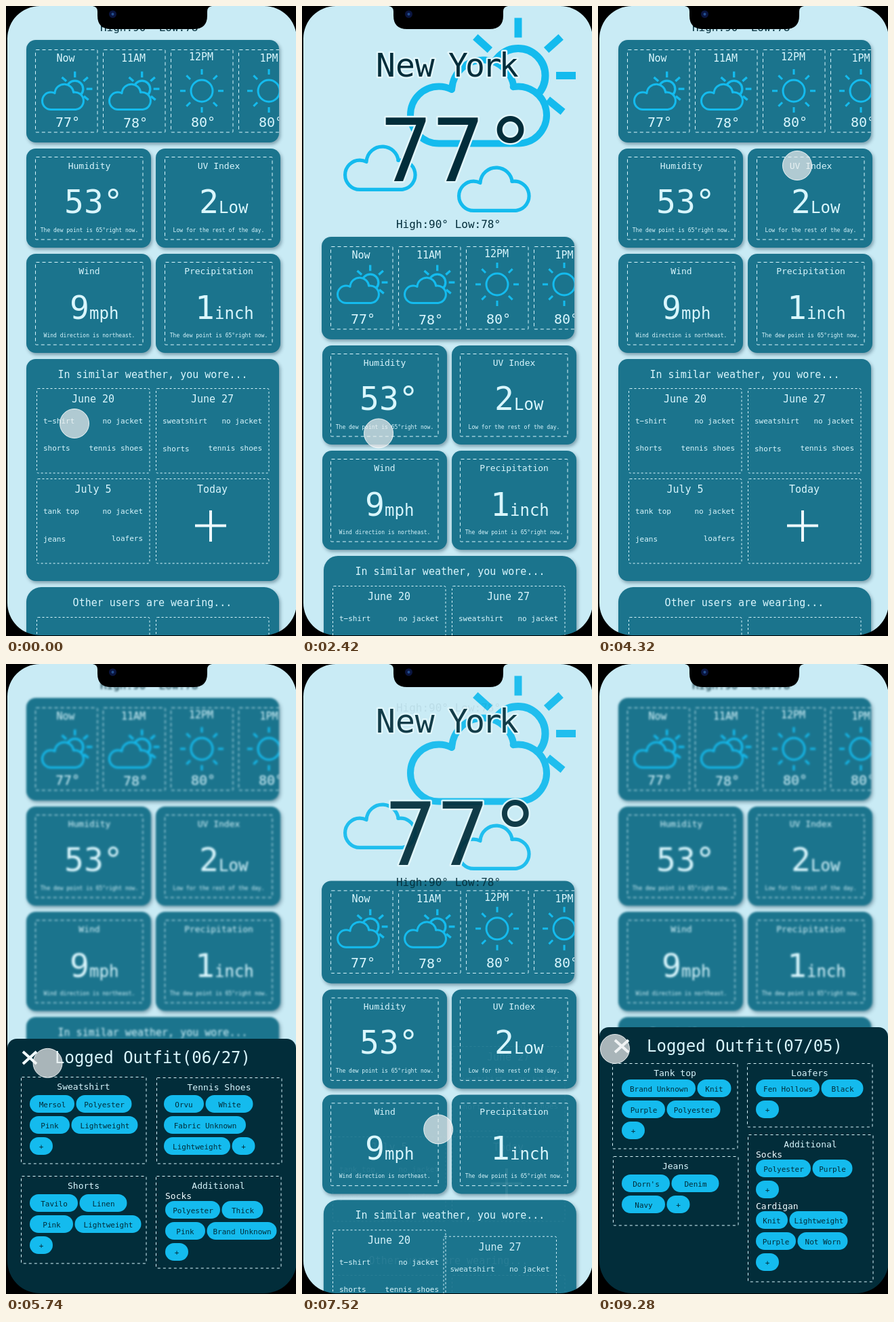
Animation, 428 px wide and 928 px high, one loop 9.66 s. Source, as an HTML page with a canvas:

```html
<!DOCTYPE html>
<html lang="en">
<head>
<meta charset="utf-8">
<title>Weather outfit log</title>
<style>
html, body { margin: 0; width: 100%; height: 100%; overflow: hidden; background: #000; }
canvas { display: block; width: 428px; height: 928px; }
</style>
</head>
<body>
<canvas id="stage"></canvas>
<script>
const W = 428, H = 928, LOOP = 9660, SCROLL = 290;
const dpr = window.devicePixelRatio || 1;
const SKY = '#c9ebf5', CARD = '#1b748d', PALE = '#d9f6fd', INK = '#022d3a', BLUE = '#14bbee';
const RAD = Math.PI / 180;
let c;

function setup(canvas) {
  canvas.width = W * dpr;
  canvas.height = H * dpr;
  const ctx = canvas.getContext('2d');
  ctx.scale(dpr, dpr);
  return ctx;
}
const clamp = v => Math.max(0, Math.min(1, v));
const smooth = u => u * u * (3 - 2 * u);
const easeOut = u => 1 - Math.pow(1 - u, 3);

// Drawing helpers
function text(str, x, y, size, align = 'center', color = PALE) {
  c.font = `${size}px "DejaVu Sans Mono", monospace`;
  c.textAlign = align;
  c.fillStyle = color;
  c.fillText(str, x, y);
}
function haloText(str, x, y, size, align, spacing = 0) {
  c.letterSpacing = spacing + 'px';
  c.font = `${size}px "DejaVu Sans Mono", monospace`;
  c.textAlign = align;
  c.lineJoin = 'round';
  c.lineWidth = 5;
  c.strokeStyle = '#e2f6fb';
  c.strokeText(str, x, y);
  text(str, x, y, size, align, INK);
  c.letterSpacing = '0px';
}
function round(x, y, w, h, r) {
  c.beginPath();
  c.roundRect(x, y, w, h, r);
}
function card(x, y, w, h, r = 14) {
  c.save();
  c.shadowColor = 'rgba(0,40,60,.38)';
  c.shadowBlur = 5 * dpr;
  c.shadowOffsetX = 2 * dpr;
  c.shadowOffsetY = 3 * dpr;
  c.fillStyle = CARD;
  round(x, y, w, h, r);
  c.fill();
  c.restore();
}
function dashed(x, y, w, h, dash, r = 1) {
  c.save();
  c.setLineDash(dash);
  c.lineWidth = 1;
  c.strokeStyle = PALE;
  round(x + .5, y + .5, w - .5, h - .5, r);
  c.stroke();
  c.restore();
}
function line(x1, y1, x2, y2, width, color) {
  c.lineWidth = width;
  c.strokeStyle = color;
  c.beginPath();
  c.moveTo(x1, y1);
  c.lineTo(x2, y2);
  c.stroke();
}
function shifted(dx, dy, alpha, draw) {
  c.save();
  c.translate(dx, dy);
  c.globalAlpha *= alpha;
  draw();
  c.restore();
}

// Icons
function sun(x, y, r, near, far, width, angles) {
  for (const a of angles) {
    const cos = Math.cos(a * RAD), sin = Math.sin(a * RAD);
    line(x + near * cos, y + near * sin, x + far * cos, y + far * sin, width, BLUE);
  }
  c.beginPath();
  c.arc(x, y, r, 0, 2 * Math.PI);
  c.stroke();
}
function cloud(left, bottom, scale, fill, withSun) {
  c.save();
  c.translate(left - 155 * scale, bottom - 207 * scale);
  c.scale(scale, scale);
  if (withSun) sun(319, 102, 40, 56, 85, 11, [-138, -90, -42, 0, 39]);
  c.beginPath();
  c.arc(202, 160, 42, 90 * RAD, 297 * RAD);
  c.arc(267, 125, 46, 184 * RAD, 352 * RAD);
  c.arc(319, 160, 42, 260 * RAD, 450 * RAD);
  c.closePath();
  c.lineWidth = 10;
  c.lineJoin = 'round';
  c.strokeStyle = BLUE;
  c.fillStyle = fill;
  c.fill();
  c.stroke();
  c.restore();
}

// Page sections, placed as in the scrolled state
function hourly(lift) {
  card(30, 50, 373, 151);
  c.save();
  round(30, 50, 373, 151, 14);
  c.clip();
  const hours = [['Now', '77°', 82, 178], ['11AM', '78°', 82, 179], ['12PM', '80°', 80, 178], ['1PM', '80°', 82, 178]];
  hours.forEach(([hour, temp, hourY, tempY], i) => {
    const x = i * 100;
    dashed(43 + x, 64, 92, 122, [5, 4]);
    text(hour, 88 + x, hourY, 15);
    text(temp, 91 + x, tempY, 20);
    if (i < 2) cloud(52 + 99 * i, 154 - lift, .303, CARD, true);
    else sun(289 + 99 * (i - 2), 125 - lift, 16, 24, 32, 3, [0, 45, 90, 135, 180, 225, 270, 315]);
  });
  c.restore();
}
function metric(x, y, dx, title, value, valueX, valueY, unit, note) {
  card(x, y, 184, 146);
  c.save();
  c.translate(dx, 0);
  dashed(x + 13, y + 12, 159, 122, [5, 4]);
  text(title, x + 93, y + 30, 13);
  text(value, valueX, valueY, 48, 'left');
  text(unit, valueX + 29, valueY, 24, 'left');
  text(note, x + 93, y + 123, 8);
  c.restore();
}
function metrics(dx) {
  metric(30, 210, dx, 'Humidity', '53°', 86, 305, '', 'The dew point is 65°right now.');
  metric(221, 210, dx, 'UV Index', '2', 285, 305, 'Low', 'Low for the rest of the day.');
  metric(30, 365, dx, 'Wind', '9', 94, 461, 'mph', 'Wind direction is northeast.');
  metric(221, 365, dx, 'Precipitation', '1', 279, 461, 'inch', 'The dew point is 65°right now.');
}
function dayBox(x, y, title, items = [], low = [0, 0]) {
  dashed(x, y, 167, 125, [3, 3], 2);
  text(title, x + 83.5, y + 21, 15);
  items.forEach((item, i) => {
    const right = i % 2, row = i >> 1;
    text(item, x + (right ? 157 : 10), y + 52 + 40 * row + (row ? low[right] : 0), 11, right ? 'right' : 'left');
  });
}
const june20 = () => dayBox(45, 563, 'June 20', ['t−shirt', 'no jacket', 'shorts', 'tennis shoes']);
const june27 = () => dayBox(221, 563, 'June 27', ['sweatshirt', 'no jacket', 'shorts', 'tennis shoes'], [1, 0]);
function laterDays() {
  dayBox(45, 696, 'July 5', ['tank top', 'no jacket', 'jeans', 'loafers'], [1, 0]);
  dayBox(221, 696, 'Today');
  line(279, 765.5, 325, 765.5, 4, '#eefbff');
  line(302, 743, 302, 789, 4, '#eefbff');
}
function othersText() {
  text('Other users are wearing...', 216, 884, 15);
  dashed(45, 900, 167, 125, [3, 3], 2);
  dashed(221, 900, 167, 125, [3, 3], 2);
}
const range = y => text('High:90° Low:78°', 216, y, 16, 'center', INK);

function prerender(draw) {
  const canvas = document.createElement('canvas');
  c = setup(canvas);
  draw();
  return canvas;
}
const clouds = prerender(() => {
  cloud(61, 273, .515, SKY);
  cloud(229, 304, .515, SKY);
  cloud(155, 207.5, 1, SKY, true);
});

// p = 0 is the top of the page, p = 1 the scrolled state
function page(p) {
  const q = 1 - p, dy = SCROLL * q;
  c.fillStyle = SKY;
  c.fillRect(0, 0, W, H);
  shifted(0, 0, q, () => c.drawImage(clouds, 0, 0, W, H));
  shifted(-q, dy, 1, () => hourly(5 * q));
  shifted(0, dy, 1, () => metrics(-q));
  shifted(2 * q, dy, 1, () => {
    card(30, 520, 373, 327, 14 + 7 * q);
    text('In similar weather, you wore...', 216.5, 548, 15);
    card(30, 856, 373, 200, 22);
  });
  shifted(0, 291 * q, 1, june20);
  if (q > 0) {
    shifted(-176 * p, 291 - 158 * p, q, june27);
    shifted(0, 0, q, () => {
      const cityY = 104 - 43 * p;
      haloText('New', 109, cityY, 48, 'left');
      haloText('York', 216, cityY, 48, 'left', -4);
      haloText('77°', 230.5 + 100 * p, 258 + 540 * p, 128, 'center');
      range(327);
    });
  }
  if (p > 0) shifted(0, 0, p, () => {
    june27();
    laterDays();
    othersText();
    range(37 + 36 * q);
  });
}

// Outfit sheets: box = x, y, height, title, chip x, first chip centre, rows of [label, width, ...]
const PLUS = ['+', 34];
const shoes = ['Orvu', 59, 'White', 70];
const fabric = ['Fabric Unknown', 121];
const light = ['Lightweight', 98, '+', 34];
const sheets = [
  { top: 494, date: '06/20', titleX: 70, boxes: [
    [22, 550, 128, 'T−shirt', 33, 40, [['Tavilo', 71, 'Cotton', 70], ['Pink', 59, 'Lightweight', 98], PLUS]],
    [221, 550, 128, 'Tennis Shoes', 233, 40, [shoes, fabric, light]],
    [22, 693, 123, 'Shorts', 33, 40, [['Tavilo', 71, 'Linen', 70], ['Black', 64, 'Lightweight', 98], PLUS]],
    [221, 693, 217, 'Additional', 233, 36, ['Socks', ['Polyester', 81, 'Thick', 61], ['Pink', 59, 'Brand Unknown', 103], PLUS,
      'Cardigan', ['Knit', 47, 'Lightweight', 86], ['Black', 59, 'Not Worn', 74, '+', 34]]]
  ] },
  { top: 552, date: '06/27', titleX: 72, boxes: [
    [22, 608, 128, 'Sweatshirt', 35, 40, [['Mersol', 66, 'Polyester', 82], ['Pink', 59, 'Lightweight', 98], PLUS]],
    [222, 609, 127, 'Tennis Shoes', 233, 39, [shoes, fabric, light]],
    [22, 754, 129, 'Shorts', 35, 40, [['Tavilo', 71, 'Linen', 70], ['Pink', 64, 'Lightweight', 98], PLUS]],
    [221, 754, 136, 'Additional', 235, 36, ['Socks', ['Polyester', 81, 'Thick', 61], ['Pink', 59, 'Brand Unknown', 103], PLUS]]
  ] },
  { top: 535, date: '07/05', titleX: 72, boxes: [
    [21, 588, 126, 'Tank top', 35, 37, [['Brand Unknown', 109, 'Knit', 50], ['Purple', 64, 'Polyester', 79], PLUS]],
    [220, 588, 94, 'Loafers', 233, 37, [['Fen Hollows', 94, 'Black', 62], PLUS]],
    [22, 725, 102, 'Jeans', 35, 40, [["Dorn's", 71, 'Denim', 70], ['Navy', 64, '+', 34]]],
    [221, 693, 217, 'Additional', 233, 36, ['Socks', ['Polyester', 81, 'Purple', 59], PLUS,
      'Cardigan', ['Knit', 47, 'Lightweight', 86], ['Purple', 59, 'Not Worn', 74], PLUS]]
  ] }
];
function chips(row, x, y) {
  for (let i = 0; i < row.length; i += 2) {
    const w = row[i + 1];
    c.fillStyle = BLUE;
    round(x, y - 13, w, 26, 13);
    c.fill();
    text(row[i], x + w / 2 + (w > 60 ? .5 : 0), y + 5, 11, 'center', INK);
    x += w + 2.5;
  }
}
function drawSheet({ top, date, titleX, boxes }) {
  c.fillStyle = INK;
  round(2, top, 426, H, 14);
  c.fill();
  const y = top + 28;
  line(25, y - 9, 45, y + 9, 4, '#f2fcff');
  line(25, y + 9, 45, y - 9, 4, '#f2fcff');
  text(`Logged Outfit(${date})`, titleX, top + 36, 24, 'left');
  for (const [x, by, h, title, chipX, first, rows] of boxes) {
    dashed(x, by, 185, h, [4, 4]);
    text(title, x + 92.5, by + 19, 13);
    let ry = by + first;
    for (const row of rows) {
      if (typeof row === 'string') {
        text(row, chipX, ry - 2, 13, 'left', '#f2fcff');
        ry += 14;
      } else {
        chips(row, chipX, ry);
        ry += 31;
      }
    }
  }
}

function bezel() {
  c.fillStyle = '#000';
  c.beginPath();
  c.rect(0, 0, W, H);
  c.roundRect(2, 0, 427, 927, 48);
  c.fill('evenodd');
  c.beginPath();
  c.moveTo(128, 0);
  c.quadraticCurveTo(135, 1, 135, 8);
  c.lineTo(135, 14);
  c.quadraticCurveTo(135, 34, 155, 34);
  c.lineTo(277, 34);
  c.quadraticCurveTo(297, 34, 297, 14);
  c.lineTo(297, 8);
  c.quadraticCurveTo(297, 1, 304, 0);
  c.fill();
  c.fillStyle = '#0a1540';
  c.beginPath();
  c.arc(157.5, 12, 5.5, 0, 2 * Math.PI);
  c.fill();
  c.fillStyle = '#24508f';
  c.beginPath();
  c.arc(157.5, 12, 2, 0, 2 * Math.PI);
  c.fill();
}

// Pointer stops: time, x, y
const stops = [
  [0, 101, 615], [350, 101, 615], [1250, 30, 528], [1750, 30, 528], [3500, 283, 837], [3700, 283, 837],
  [4250, 294, 235], [4330, 294, 235], [4850, 304, 612], [5150, 304, 612], [5890, 33, 585], [6250, 33, 585],
  [7200, 201, 706], [7453, 201, 706], [7995, 205, 230], [8060, 205, 230], [8450, 125, 745], [8650, 125, 745],
  [9200, 25, 567], [LOOP, 25, 567]
];
function pointerAt(t) {
  const i = stops.findIndex(s => s[0] > t);
  const [t0, x0, y0] = stops[i - 1], [t1, x1, y1] = stops[i];
  const u = smooth((t - t0) / (t1 - t0));
  return [x0 + (x1 - x0) * u, y0 + (y1 - y0) * u];
}
function pointer([x, y]) {
  c.beginPath();
  c.arc(x, y, 21.5, 0, 2 * Math.PI);
  c.fillStyle = 'rgba(240,240,240,.7)';
  c.fill();
  c.lineWidth = 1;
  c.strokeStyle = 'rgba(255,255,255,.85)';
  c.stroke();
}

// Each visit: drag the page up, open a sheet, close it back to the top
const visits = [
  { drag: -9999, from: 0, open: 300, close: 1650 },
  { drag: 3700, from: 837, open: 5000, close: 6100 },
  { drag: 7453, from: 706, open: 8520, close: Infinity }
];
const home = prerender(() => page(0));
const full = prerender(() => page(1));
const blurred = prerender(() => {
  c.fillStyle = SKY;
  c.fillRect(0, 0, W, H);
  c.filter = `blur(${1.8 * dpr}px)`;
  c.drawImage(full, 0, 0, W, H);
});
const stage = setup(document.getElementById('stage'));

function put(image, alpha = 1) {
  c.globalAlpha = alpha;
  c.drawImage(image, 0, 0, W, H);
  c.globalAlpha = 1;
}
function frame() {
  const t = performance.now() % LOOP;
  c = stage;
  let n = 0;
  while (n < 2 && t >= visits[n + 1].drag) n++;
  const visit = visits[n], spot = pointerAt(t);
  const dragging = visit.drag > 0 && t < visit.drag + 545;
  const p = dragging ? clamp((visit.from - spot[1]) / SCROLL) : 1;
  const open = easeOut(clamp((t - visit.open) / 450));
  const gone = smooth(clamp((t - visit.close) / 400));

  if (gone === 1 || p === 0) put(home);
  else if (p < 1) page(p);
  else {
    put(full);
    if (open > 0) {
      put(blurred, open);
      shifted(0, (1 - open) * (H - sheets[n].top), 1, () => drawSheet(sheets[n]));
    }
    if (gone > 0) put(home, gone);
  }
  bezel();
  pointer(spot);
  requestAnimationFrame(frame);
}
frame();
</script>
</body>
</html>
```
